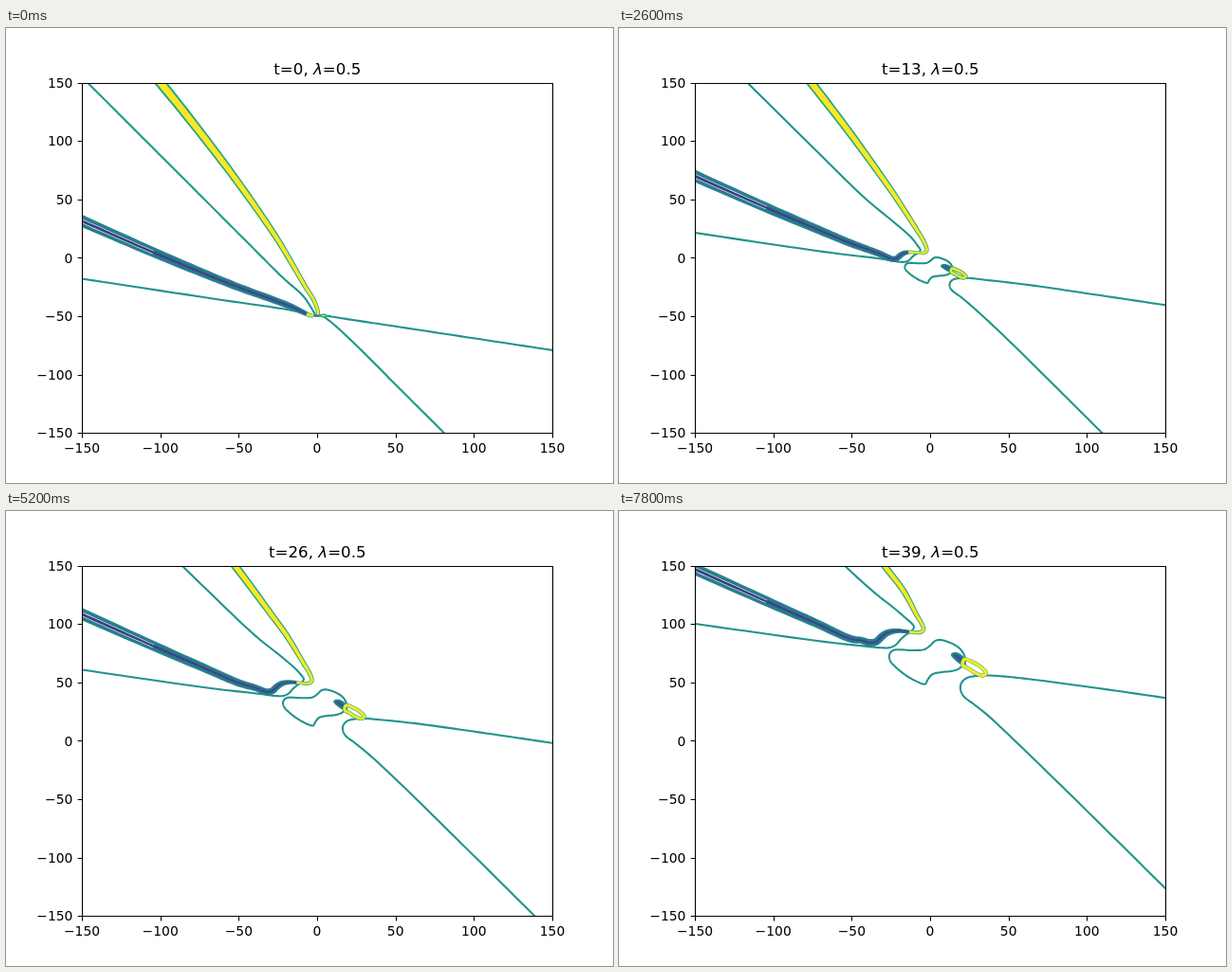
Animation of 640 by 480 pixels, one loop 8 s. Source, as an HTML page:

```html
<!DOCTYPE html>
<html lang="en">
<head>
<meta charset="utf-8">
<title>Contour plot</title>
<style>
html, body { margin: 0; width: 100%; height: 100%; overflow: hidden; background: #fff; }
svg { display: block; width: 640px; height: 480px; font-family: "DejaVu Sans", sans-serif; }
.line { fill: none; stroke: #1f948c; stroke-width: 2.08; stroke-linejoin: round; }
.axis { fill: none; stroke: #000; stroke-width: 1.1; }
</style>
</head>
<body>
<svg viewBox="0 0 640 480">
  <rect width="640" height="480" fill="#fff"/>
  <clipPath id="box"><rect x="80.5" y="58" width="496" height="369.5"/></clipPath>
  <g id="plot" clip-path="url(#box)"></g>
  <g id="axes"></g>
  <text x="328.3" y="49" font-size="16.67" text-anchor="middle">t=<tspan id="count">0</tspan>, <tspan font-style="italic">λ</tspan>=0.5</text>
</svg>
<script>
const NS = "http://www.w3.org/2000/svg";
const LAST = 39, STEP = 200, COUNT = 40;
const RATE = 3.696, RISE = RATE * LAST;
const CX = 328, CY = 303.5;
const $ = id => document.getElementById(id);

function add(parent, tag, attrs, text) {
  const el = document.createElementNS(NS, tag);
  for (const k in attrs) el.setAttribute(k, attrs[k]);
  if (text !== undefined) el.textContent = text;
  parent.appendChild(el);
  return el;
}

// Axes
const axes = $("axes");
let ticks = "M80.5 58.5H576.5V427.5H80.5Z";
for (let v = -150; v <= 150; v += 50) {
  const x = 328 + v * 496 / 300, y = 242.4 - v * 1.232;
  const label = String(v).replace("-", "\u2212");
  ticks += `M${Math.floor(x + .5) + .5} 427.5v4.9M80.5 ${Math.floor(y + .5) + .5}h-4.9`;
  add(axes, "text", { x, y: 448, "font-size": 13.89, "text-anchor": "middle" }, label);
  add(axes, "text", { x: 70.4, y: Math.round(y + 5.2), "font-size": 13.89, "text-anchor": "end" }, label);
}
add(axes, "path", { class: "axis", d: ticks });

// Points: start and end place in the frame that rises with the pattern.
// Inner points travel with the square root of time, outer ones with time.
const move = (x0, y0, x1, y1, w) => ({ x0, y0, x1, y1: y1 + RISE, w });
const spread = x => 329.2 + .12 * (x - CX);
const near = (x, y, w, x0 = spread(x)) => ({ x0, y0: CY, x1: x, y1: y + RISE, w, core: true });
const ring = (pts, start) => pts.map(([x, y]) => near(x, y, 0, start && start(x)));

// Outer branches; each bends away from its asymptote as time / distance
const across = (x, y, dx, w) => ({ x0: x, y0: y, x1: x + dx, y1: y, w, far: true });
const along = (x, y, dy, w) => ({ x0: x, y0: y, x1: x, y1: y + dy, w, far: true });
const northWest = d => across(331.9 - d, CY - d, 780 / d);
const southEast = d => across(337.8 + 1.003 * d, CY + d, -300 / d);
const flat = u => along(CX + u, 302.2 + .152 * u, 350 / u);
const bright = d => across(329 - 165.5 * (d / 245) ** 1.214, CY - d, 780 / d, 2.2 + .0139 * d);
const dark = u => along(CX - u, 302 - 98.5 * (u / 248) ** 1.13, 480 / u, 2.9 + .0129 * u);

const upper = [
  ...[280, 200, 130, 75].map(northWest),
  move(292, 263.5, 290, 102.5), move(314, 283.5, 303.5, 114),
  near(309.5, 119.5), near(311, 122.5), near(308.5, 126.5), near(302, 131),
  near(297, 135.5), near(292, 141), near(286, 144), near(277, 144.3),
  move(305, 298.7, 257, 142.4),
  ...[-110, -248, -290].map(flat)
];
const lower = [
  ...[302, 248, 172, 102].map(flat), move(360, 307.1, 402, 174.2),
  near(388, 173.5), near(375, 174.2), near(366, 176.5), near(361, 181.5),
  near(360, 187.5), near(363, 195),
  move(346, 313, 373, 203), move(368, 333.5, 387.5, 214.4),
  ...[75, 130, 200, 300].map(southEast)
];
const band = [
  ...[278, 248, 165, 120, 83].map(dark), move(298, 292.9, 256, 136.5, 3.5),
  near(264, 139, 4), near(271, 138, 4), near(277, 132.5, 4), near(283, 128.5, 3.5),
  near(293, 126.5, 2.5), near(306, 127.5, 1.9), near(317, 128, 2.2),
  move(329, 301, 321, 125.5, 2.1), move(325, 288, 319.5, 119.5, 2.3),
  move(316, 273.5, 314, 110, 2.6),
  ...[75, 101, 150, 212, 245, 290].map(bright)
];
const TURN = 11;
const loop = ring([
  [289, 147], [310, 147], [322, 146], [328, 142], [333, 137.3], [338, 136], [348, 138.5],
  [358, 144], [363, 150], [365, 157], [363, 162], [358, 166.5], [350, 169], [340, 170],
  [330, 172.5], [325.5, 178], [323, 182.5], [319, 182], [305, 175], [292, 165], [286, 158], [285, 152]
]);
const blob = ring([
  [351, 151.5], [355, 150], [361, 153], [364, 157], [364.5, 163], [360, 160.5], [355, 156.5]
], x => 311.5 + .6 * (x - CX));
const petal = ring([
  [364, 156.5], [374, 160], [382, 165], [387, 171], [384, 173.5], [376, 171], [368, 166], [362.5, 162.5]
]);

const mix = (a, b, k) => a + (b - a) * k;

function place(pts, t) {
  const s = Math.sqrt(t / LAST);
  return pts.map(p => {
    const k = p.far ? s * s : s;
    return {
      x: mix(p.x0, p.x1, k),
      y: mix(p.y0, p.y1, k) - RATE * t,
      w: (p.w || 0) * (p.core ? .5 + .5 * s : 1)
    };
  });
}

// Centripetal spline, N samples per span
const N = 10;
function smooth(pts, closed) {
  const n = pts.length, out = [];
  const at = i => pts[closed ? (i + n) % n : Math.max(0, Math.min(n - 1, i))];
  const gap = (a, b) => Math.max(.05, Math.sqrt(Math.hypot(b.x - a.x, b.y - a.y)));
  const spans = closed ? n : n - 1;
  for (let i = 0; i < spans; i++) {
    const a = at(i - 1), b = at(i), c = at(i + 1), d = at(i + 2);
    const g0 = gap(a, b), g1 = gap(b, c), g2 = gap(c, d);
    const tan = k => [
      g1 * ((b[k] - a[k]) / g0 - (c[k] - a[k]) / (g0 + g1)) + c[k] - b[k],
      g1 * ((d[k] - c[k]) / g2 - (d[k] - b[k]) / (g1 + g2)) + c[k] - b[k]
    ];
    const mx = tan("x"), my = tan("y");
    for (let j = 0; j < N; j++) {
      const u = j / N, v = 1 - u;
      const h0 = v * v * (1 + 2 * u), h1 = u * u * (3 - 2 * u), q0 = u * v * v, q1 = -u * u * v;
      out.push({
        x: h0 * b.x + h1 * c.x + q0 * mx[0] + q1 * mx[1],
        y: h0 * b.y + h1 * c.y + q0 * my[0] + q1 * my[1],
        w: mix(b.w, c.w, u)
      });
    }
  }
  if (!closed) out.push(pts[n - 1]);
  return out;
}

const trace = (pts, closed) =>
  "M" + pts.map(p => p.x.toFixed(2) + " " + p.y.toFixed(2)).join("L") + (closed ? "Z" : "");

// Outline of a strip between two width fractions
function strip(pts, from, to) {
  const side = k => pts.map((p, i) => {
    const a = pts[Math.max(0, i - 1)], b = pts[Math.min(pts.length - 1, i + 1)];
    const dx = b.x - a.x, dy = b.y - a.y, len = Math.hypot(dx, dy) || 1;
    return { x: p.x - dy / len * p.w * k, y: p.y + dx / len * p.w * k };
  });
  return trace(side(from).concat(side(to).reverse()), true);
}

const plot = $("plot");
const path = attrs => add(plot, "path", attrs);
const fill = color => path({ fill: color });
const stroke = (color, width, inside = "none") =>
  path({ fill: inside, stroke: color, "stroke-width": width, "stroke-linejoin": "round" });

const upperEl = path({ class: "line" }), lowerEl = path({ class: "line" }), loopEl = path({ class: "line" });
const darkEls = [
  [fill("#26828e"), -1, 1], [fill("#2d708e"), -.55, .55],
  [fill("#355f8d"), -.28, .28], [fill("#46307e"), -.1, .12]
];
const gapEls = [[fill("#fff"), -.34, -.24], [fill("#fff"), .28, .38]];
const brightEls = [[fill("#25a785"), -1, 1], [fill("#fde725"), -.63, .63]];
const blobEl = stroke("#26828e", 2.2, "#3b528b");
const petalEdge = stroke("#27ad81", 4.2), petalEl = stroke("#fde725", 3);

function draw(t) {
  const s = Math.sqrt(t / LAST);
  const curve = (pts, closed) => trace(smooth(place(pts, t), closed), closed);
  const paint = (els, pts) => els.forEach(([el, a, b]) => el.setAttribute("d", strip(pts, a, b)));
  upperEl.setAttribute("d", curve(upper));
  lowerEl.setAttribute("d", curve(lower));
  loopEl.setAttribute("d", curve(loop, true));

  const all = smooth(place(band, t));
  const cut = Math.round((TURN - 5.3 * (1 - s) ** 1.7) * N);
  paint(darkEls, all.slice(0, cut + 1));
  paint(gapEls, all.slice(0, 2 * N));
  paint(brightEls, all.slice(cut));

  blobEl.setAttribute("d", curve(blob, true));
  const leaf = curve(petal, true);
  petalEdge.setAttribute("d", leaf);
  petalEl.setAttribute("d", leaf);
  petalEl.setAttribute("stroke-width", mix(1.2, 3.3, s));
  $("count").textContent = t;
}

const start = performance.now();
let shown = -1;
function tick() {
  const t = Math.floor((performance.now() - start) / STEP) % COUNT;
  if (t !== shown) draw(shown = t);
  requestAnimationFrame(tick);
}
tick();
</script>
</body>
</html>
```
